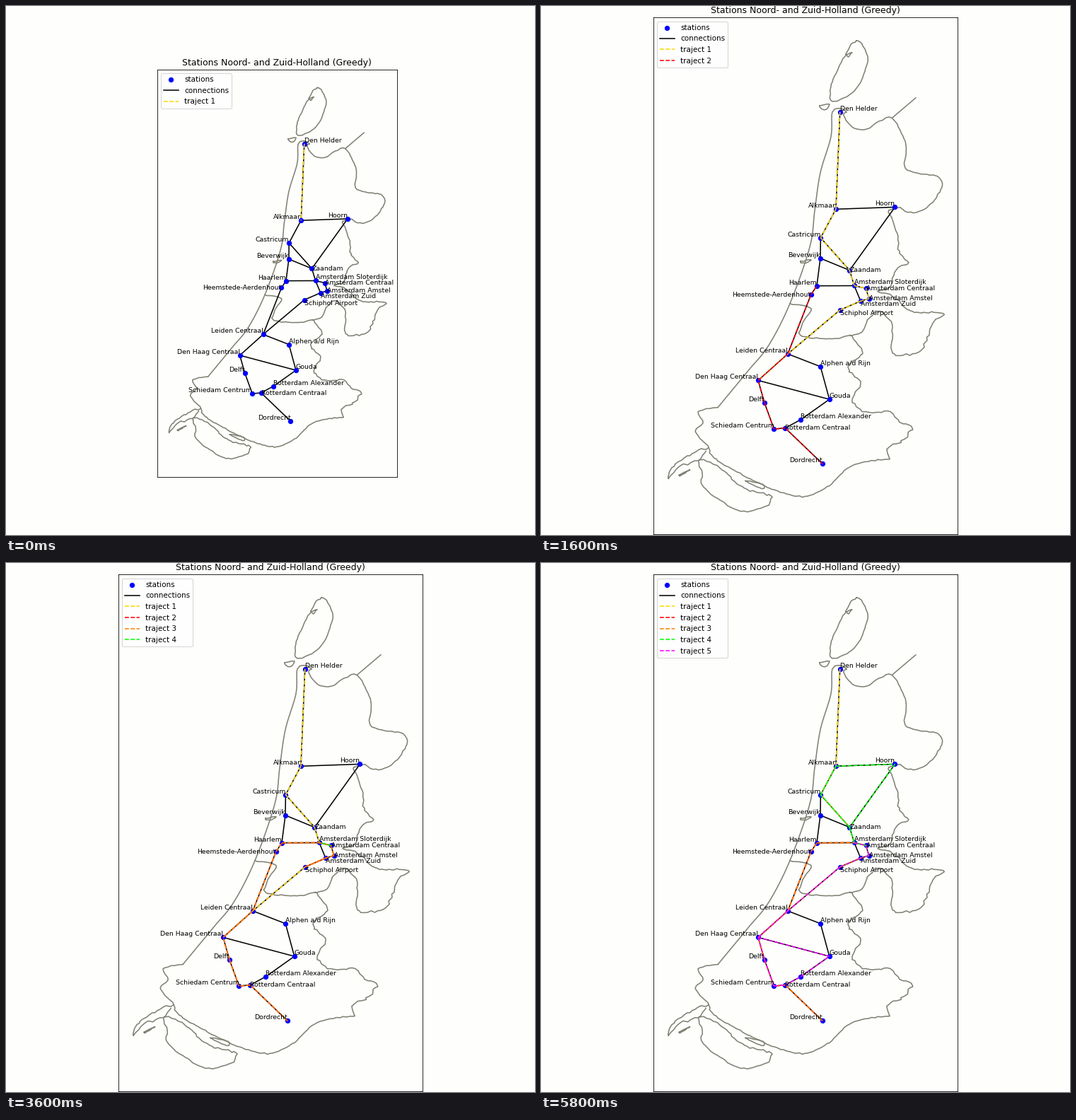
A matplotlib script that plays this animation: 748x748 px, repeating every 5900 ms.

```python
from itertools import pairwise

import matplotlib.pyplot as plt
import numpy as np
from matplotlib.animation import FuncAnimation

SIZE = 748
PAPER = "#fefefc"
COAST = "#808073"
rng = np.random.default_rng(4)

# code: name, x, y, horizontal and vertical text alignment
STATIONS = {
    "dhl": ("Den Helder", 422.8, 149.7, "left", "bottom"),
    "alk": ("Alkmaar", 417, 287.5, "right", "bottom"),
    "hrn": ("Hoorn", 500.6, 284.6, "right", "bottom"),
    "cas": ("Castricum", 395.4, 328, "right", "bottom"),
    "bev": ("Beverwijk", 395, 357, "right", "bottom"),
    "zaa": ("Zaandam", 436.4, 374, "left", "center"),
    "haa": ("Haarlem", 390, 396, "right", "bottom"),
    "hee": ("Heemstede-Aerdenhout", 381.8, 408.5, "right", "center"),
    "slo": ("Amsterdam Sloterdijk", 443, 395.8, "left", "bottom"),
    "cen": ("Amsterdam Centraal", 459.6, 399.7, "left", "center"),
    "ams": ("Amsterdam Amstel", 463.8, 414, "left", "center"),
    "zui": ("Amsterdam Zuid", 452, 417.6, "left", "top"),
    "sch": ("Schiphol Airport", 422.8, 430.2, "left", "top"),
    "lei": ("Leiden Centraal", 348.9, 492.3, "right", "bottom"),
    "alp": ("Alphen a/d Rijn", 395.2, 510.3, "left", "bottom"),
    "dhg": ("Den Haag Centraal", 307, 529.8, "right", "bottom"),
    "del": ("Delft", 315.9, 561.3, "right", "bottom"),
    "gou": ("Gouda", 407.8, 556.6, "left", "bottom"),
    "alx": ("Rotterdam Alexander", 367.4, 585.3, "left", "bottom"),
    "sdm": ("Schiedam Centrum", 329.4, 598.6, "right", "bottom"),
    "rtd": ("Rotterdam Centraal", 345.3, 597.2, "left", "center"),
    "drd": ("Dordrecht", 398.2, 648, "right", "bottom"),
}

CONNECTIONS = [
    "dhl alk hrn zaa slo zui", "alk cas zaa", "cas bev haa slo cen ams zui sch lei",
    "bev zaa", "haa hee lei dhg gou", "lei alp gou alx rtd drd", "dhg del sdm rtd",
]

SOUTH_NORTH = "drd rtd sdm del dhg lei hee haa slo cen ams zui sch zui"
TRAJECTS = [
    ("gold", "dhl alk cas zaa slo cen ams zui sch lei dhg"),
    ("red", SOUTH_NORTH),
    ("#ff8000", SOUTH_NORTH),
    ("lime", "cen slo zaa cas alk hrn zaa slo cen ams zui sch"),
    ("magenta", "slo cen ams zui sch lei dhg del sdm rtd alx gou dhg"),
]


def shore(wiggle, *keys, closed=False):
    """Draw a smooth curve through a few key points, with random small bends."""
    p = np.array(keys, float)
    p = np.vstack([p[-1], p, p[:2]] if closed else [p[0], p, p[-1]])
    spans = []
    for a, b, c, d in zip(p, p[1:], p[2:], p[3:]):
        n = max(3, int(np.hypot(*(c - b)) / 4))
        t = np.linspace(0, 1, n, endpoint=False)[:, None]
        span = b + t * (c - a) / 2 + t**2 * (a - 2.5 * b + 2 * c - d / 2) \
            + t**3 * (1.5 * (b - c) + (d - a) / 2)
        span[1:] += rng.normal(0, wiggle, span[1:].shape)
        spans.append(span)
    ax.plot(*np.vstack([*spans, p[-2]]).T, color=COAST, lw=1.5, zorder=0.5)


def draw_coast():
    # northern islands
    shore(0.5, (446, 49), (462, 71), (455, 101), (440, 123), (412, 135), (410, 114),
          (425, 79), closed=True)
    shore(0.5, (432, 69), (440, 66), (435, 72), closed=True)
    shore(0.6, (394, 141), (408, 139), (401, 147), closed=True)
    # west coast with its harbour
    shore(0, (432, 150), (424, 145), (412, 150), (410, 185), (395, 236), (387, 290),
          (380, 341), (352, 421), (322, 480), (293, 516), (250, 568))
    shore(0.8, (367, 361), (382, 359), (374, 364), closed=True)
    # south coast
    shore(0.5, (250, 568), (222, 574), (229, 590), (218, 602), (237, 625), (245, 640),
          (285, 664), (334, 686), (373, 694), (408, 679), (432, 655), (458, 645), (493, 641))
    # north-east coast, dam and inland lake
    shore(0.4, (432, 150), (428, 155), (441, 172), (461, 174), (478, 163), (497, 159),
          (516, 196), (515, 229), (541, 238), (561, 241), (567, 257), (545, 286),
          (519, 292), (508, 285), (492, 289))
    shore(0, (497, 158), (530, 130))
    shore(0.8, (492, 289), (504, 322), (507, 350), (520, 363), (502, 374), (494, 397),
          (476, 404), (497, 411), (525, 432), (569, 435), (554, 449), (537, 488),
          (497, 491), (497, 452), (480, 432), (465, 441), (453, 462), (437, 466))
    # provincial borders
    shore(0.5, (352, 421), (382, 428), (372, 445), (367, 466), (411, 471), (437, 466))
    shore(1, (437, 466), (455, 492), (434, 511), (452, 534), (440, 557), (460, 574),
          (494, 574), (507, 589), (524, 595), (514, 613), (489, 627), (493, 641))
    # delta islands
    shore(0.8, (237, 625), (217, 632), (185, 653), (180, 669), (195, 652), (225, 642),
          (233, 630))
    shore(0.6, (195, 664), (210, 656), (204, 661), closed=True)
    shore(0.7, (224, 642), (253, 654), (287, 682), (327, 695), (310, 711), (274, 712),
          (230, 681), (228, 662), closed=True)
    shore(0.3, (289, 672), (314, 677), (312, 683), closed=True)


def legs(route):
    """Coordinate lists for every leg of a route."""
    spots = [STATIONS[code][1:3] for code in route.split()]
    return [tuple(zip(a, b)) for a, b in pairwise(spots)]


fig, ax = plt.subplots(figsize=(10, 10), dpi=SIZE / 10, facecolor=PAPER)
ax.set(xlim=(158.4, 589.6), ylim=(748, 16.4), xticks=[], yticks=[],
       aspect="equal", facecolor=PAPER)
ax.set_title("Stations Noord- and Zuid-Holland (Greedy)", fontsize=12)
draw_coast()

for route in CONNECTIONS:
    for leg in legs(route):
        track, = ax.plot(*leg, color="black", lw=1.5, zorder=0.9, label="connections")

names, xs, ys, *_ = zip(*STATIONS.values())
dots = ax.scatter(xs, ys, color="blue", label="stations")
for name, x, y, ha, va in STATIONS.values():
    ax.text(x, y, name, fontsize=9, ha=ha, va=va)

steps, starts = [], []
for number, (color, route) in enumerate(TRAJECTS, 1):
    starts.append(len(steps))
    for leg in legs(route):
        steps += ax.plot(*leg, "--", color=color, lw=1.5, label=f"traject {number}")


def update(i):
    if i == 0:
        fig.subplots_adjust(left=0.125, right=0.9, bottom=0.11, top=0.88)
    else:
        fig.subplots_adjust(left=0, right=1, bottom=0.6 / SIZE, top=1 - 16.4 / SIZE)
    for k, step in enumerate(steps):
        step.set_visible(k <= i)
    ax.legend(handles=[dots, track] + [steps[s] for s in starts if s <= i],
              loc="upper left", fontsize=10, labelspacing=0.545)
    return steps


anim = FuncAnimation(fig, update, frames=len(steps), interval=100,
                     repeat=True, repeat_delay=0, blit=False)
plt.show()
```
